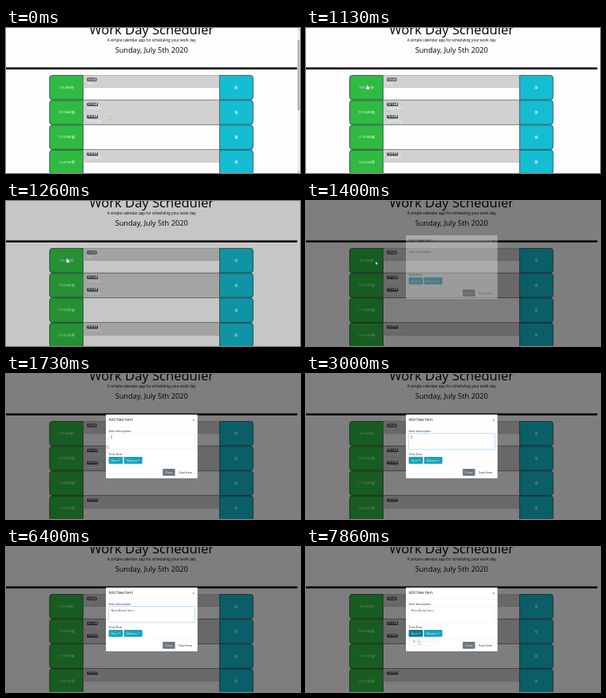
An HTML page for the animation above (8000 ms loop, 368 px wide and 182 px high).

```html
<!DOCTYPE html>
<html lang="en">
<head>
<meta charset="utf-8">
<title>Work Day Scheduler</title>
<style>
  * { box-sizing: border-box; }
  html, body { margin: 0; width: 100%; height: 100%; overflow: hidden; background: #fdfdfd; }
  #screen { position: absolute; width: 1600px; height: 792px; overflow: hidden; transform: scale(.23); transform-origin: 0 0;
    font: 16px/24px "Open Sans", sans-serif; color: #212529; }
  #screen > *, .at { position: absolute; }
  .head { width: 1584px; text-align: center; white-space: nowrap; color: #000; }
  .rule { top: 215px; width: 1585px; height: 11px; background: #000; }
  .row { left: 236px; width: 1110px; height: 135.6px; display: flex; }
  .side { width: 185px; display: flex; align-items: center; justify-content: center; gap: 2px; color: #fff; border: 3px solid #222c30; }
  .hour { background: #2fba42; border-radius: 16px 0 0 16px; }
  .save { background: #14bdd1; border-radius: 0 16px 16px 0; }
  .slot { width: 740px; border: solid #444; border-width: 2px 0; }
  .item { height: 67px; padding: 10px 20px; background: #d1d1d1; border-bottom: 2px solid #b5b5b5; color: #fff; font-size: 14px; line-height: 20px; }
  .item b { display: table; margin: 3px 0; padding: 3px 4px; border-radius: 4px; background: #343a40; font-size: 11.5px; line-height: 12px; }
  #bar { right: 0; width: 15px; height: 792px; background: #f1f1f1; }
  #bar i { position: absolute; top: 64px; left: 2px; width: 11px; height: 386px; background: #b4b4b4; }
  #bar::before, #bar::after { content: ""; position: absolute; left: 3px; border: solid transparent; border-width: 0 4px 5px; border-bottom-color: #505050; }
  #bar::before { top: 5px; }
  #bar::after { bottom: 5px; transform: scaleY(-1); }
  #shade { inset: 0; background: #000; }
  #modal { left: 542.5px; top: 220px; width: 500px; height: 350px; background: #fff; border: 1px solid rgba(0,0,0,.2); border-radius: 5px; }
  #modal hr { position: absolute; left: 0; right: 0; margin: 0; border: 0; border-top: 1px solid #dee2e6; }
  #field { left: 15px; top: 104px; width: 468px; height: 86px; padding: 6px 12px; border: 1px solid; border-radius: 4px; color: #495057; white-space: pre; }
  #caret { display: inline-block; width: 2px; height: 20px; margin-left: 1px; vertical-align: -4px; background: #222; }
  .btn { position: absolute; height: 38px; padding: 7px 13px; border-radius: 4px; color: #fff; white-space: nowrap; }
  .drop { background: #17a2b8; }
  .drop::after { content: ""; display: inline-block; margin-left: 4px; vertical-align: 4px; border: solid transparent; border-width: 5px 5px 0; border-top-color: #fff; }
  #menu { left: 15px; top: 270px; width: 160px; height: 46px; padding: 8px 0; background: #fff; border: 1px solid rgba(0,0,0,.15); border-radius: 4px; }
  #menu div { padding: 2px 24px; background: #f8f9fa; }
  #mouse { left: 0; top: 0; overflow: visible; }
</style>
</head>
<body>
<div id="screen">
  <div class="head" style="top:-35px;font-size:72px;line-height:86px">Work Day Scheduler</div>
  <div class="head" style="top:54px;font-size:20px;line-height:30px">A simple calendar app for scheduling your work day</div>
  <div class="head" style="top:95px;font-size:40px;line-height:48px">Sunday, July 5th 2020</div>
  <div class="rule"></div>
  <div id="rows" style="inset:0"></div>
  <div id="bar"><i></i></div>
  <div id="shade"></div>
  <div id="modal">
    <div class="at" style="left:15px;top:15px;font-size:20px;line-height:30px">Add New Item</div>
    <b class="at" style="right:14px;top:17px;font-size:24px;opacity:.5">×</b>
    <hr style="top:62px">
    <div class="at" style="left:15px;top:79px">Item description</div>
    <div id="field" class="at"><span id="typed"></span><span id="caret"></span></div>
    <div class="at" style="left:15px;top:205px">Time Due:</div>
    <div id="hourBtn" class="btn drop" style="left:15px;top:231px">Hour</div>
    <div class="btn drop" style="left:98px;top:231px">Minutes</div>
    <hr style="top:282px">
    <div class="btn" style="right:122px;top:296px;background:#6c757d">Close</div>
    <div class="btn" style="right:15px;top:296px;color:#212529">Save Item</div>
    <div id="menu" class="at"><div>9</div></div>
  </div>
  <svg id="mouse" width="24" height="28" fill="#fff" stroke="#444" stroke-linejoin="round">
    <path id="arrow" d="M0 0V18L4 14L7 21L10 20L7 13H13Z"/>
    <path id="hand" d="M-3 1Q0 -3 3 1V8L12 10Q14 11 13 16L11 24H-1L-8 14Q-8 10 -3 13Z"/>
  </svg>
</div>
<script>
const $ = id => document.getElementById(id);
const clamp = x => Math.min(1, Math.max(0, x));
const ramp = (t, start, length) => clamp((t - start) / length);
const smooth = x => x * x * (3 - 2 * x);
const LOOP = 8000, CLICK = 7200, FOCUS = 1680;
const TEXT = "New Modal Item";
const KEYS = [4130, 4260, 4400, 4530, 4730, 4800, 4860, 5060, 5130, 5330, 5400, 5460, 5660, 5800];
// time, x, y of the pointer
const PATH = [[60, 130, 111], [800, 76.5, 72], [1260, 76.5, 72], [1730, 126, 89], [1860, 133, 92],
  [6730, 133, 92], [7060, 138, 108], [7300, 138, 108], [7860, 141.5, 117]];

const icon = path => `<svg width="17" height="17" viewBox="0 0 15 15" fill="none" stroke="#fff" stroke-width="2"><path d="${path}"/></svg>`;
const PLUS = icon("M1 1H14V14H1ZM4 7.5H11M7.5 4V11");
const DISK = icon("M1 1H11L14 4V14H1ZM4 1V5H10V1M4 9H11V12H4Z");
const schedule = [
  ["9:00 AM", ["9:00 AM", "Test"]],
  ["10:00 AM", ["10:15 AM", "Check inbox"], ["10:30 AM", "Team review"]],
  ["11:00 AM"],
  ["12:00 PM", ["12:00 PM", "Lunch break"]]
];
$("rows").innerHTML = schedule.map(([hour, ...items], i) => `
  <div class="row at" style="top:${257 + i * 135.6}px">
    <div class="side hour">${hour}${PLUS}</div>
    <div class="slot">${items.map(([time, note]) => `<div class="item"><b>${time}</b>${note}</div>`).join("")}</div>
    <div class="side save">${DISK}</div>
  </div>`).join("");

const show = (id, on) => $(id).style.visibility = on ? "visible" : "hidden";

function pointer(t) {
  const next = PATH.findIndex(p => p[0] > t);
  if (next === 0) return PATH[0].slice(1);
  if (next < 0) return PATH[PATH.length - 1].slice(1);
  const [t0, x0, y0] = PATH[next - 1], [t1, x1, y1] = PATH[next];
  const k = smooth((t - t0) / (t1 - t0));
  return [x0 + (x1 - x0) * k, y0 + (y1 - y0) * k];
}

function render(t) {
  show("bar", t < 1100);
  $("shade").style.opacity = .5 * ramp(t, 1195, 150);
  $("modal").style.opacity = ramp(t, 1350, 150);
  $("modal").style.transform = `translateY(${-50 * (1 - ramp(t, 1350, 300)) ** 2}px)`;

  const typed = KEYS.filter(k => k <= t).length;
  $("typed").textContent = TEXT.slice(0, typed);
  const since = typed === TEXT.length ? 5860 : typed ? KEYS[typed - 1] : 1600;
  const blinkOn = Math.floor((t - since) / 530) % 2 === 0;
  show("caret", t >= 1650 && t < CLICK && blinkOn);

  const focus = smooth(ramp(t, FOCUS, 150)) - smooth(ramp(t, CLICK, 150));
  const mix = (a, b) => Math.round(a + (b - a) * focus);
  $("field").style.borderColor = `rgb(${mix(206, 128)},${mix(212, 189)},${mix(218, 255)})`;
  $("field").style.boxShadow = `0 0 0 ${3.2 * focus}px rgba(0,123,255,${.25 * focus})`;

  const press = ramp(t, CLICK, 150);
  $("hourBtn").style.background = `rgb(${23 - 6 * press},${162 - 40 * press},${184 - 45 * press})`;
  show("menu", t >= CLICK);

  const [x, y] = pointer(t);
  const visible = t < 1860 || t >= 6730;
  const overButton = t > 700 && t < 1400 || t > 7000;
  $("mouse").style.transform = `translate(${x / .23}px,${y / .23}px)`;
  show("arrow", visible && !overButton);
  show("hand", visible && overButton);
}

const start = performance.now();
function tick() {
  render((performance.now() - start) % LOOP);
  requestAnimationFrame(tick);
}
tick();
</script>
</body>
</html>
```
